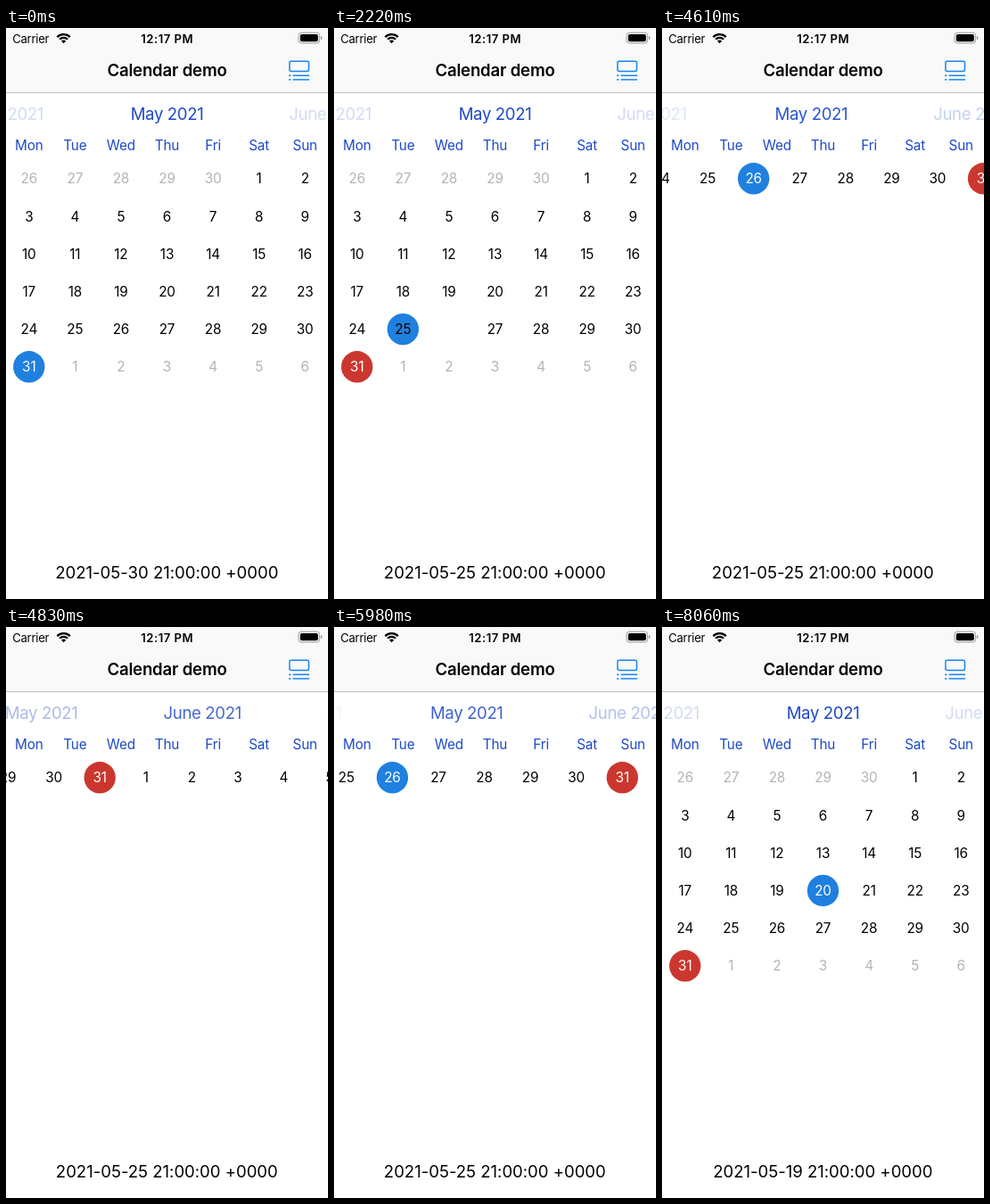
An HTML page with a canvas that plays this animation: 361 px wide and 640 px high, repeating every 8.13 s.

```html
<!DOCTYPE html>
<html lang="en">
<head>
<meta charset="utf-8">
<title>Calendar demo</title>
<style>
html, body { margin: 0; width: 100%; height: 100%; overflow: hidden; background: #fff; }
canvas { display: block; width: 361px; height: 640px; }
</style>
</head>
<body>
<canvas id="stage"></canvas>
<script>
const W = 361, H = 640, LOOP = 8130;
const COL = W / 7, ROW = 42.2, TOP = 168.8, RADIUS = 17.7;
const BLUE = '#1f80df', RED = '#cb372e', HEAD = '#1d49c9', TINT = '#1485f5', GRAY = '#b3b3b3';
const DAYS = ['Mon', 'Tue', 'Wed', 'Thu', 'Fri', 'Sat', 'Sun'];
const MONTH_TITLES = ['April 2021', 'May 2021', 'June 2021'];
const WEEK_TITLES = ['May 2021', 'May 2021', 'June 2021', 'June 2021'];
const TODAY = 31;

// Taps on a day; the circles cross-fade in two steps.
const PICKS = [
  { at: -1000, day: 31, step: 100 },
  { at: 1290, day: 25, step: 105 },
  { at: 2220, day: 26, step: 110 },
  { at: 7860, day: 20, step: 100 }
];

const canvas = document.getElementById('stage');
const ctx = canvas.getContext('2d');
const ratio = window.devicePixelRatio || 1;
canvas.width = W * ratio;
canvas.height = H * ratio;

function text(str, x, y, size, color, { weight = 400, align = 'center', track = -0.01 } = {}) {
  ctx.font = `${weight} ${size}px Inter, "Liberation Sans", sans-serif`;
  ctx.letterSpacing = (track * size) + 'px';
  ctx.textAlign = align;
  ctx.fillStyle = color;
  ctx.fillText(str, x, y);
}

function disc(x, y, r, color, alpha = 1) {
  ctx.globalAlpha = alpha;
  ctx.fillStyle = color;
  ctx.beginPath();
  ctx.arc(x, y, r, 0, Math.PI * 2);
  ctx.fill();
  ctx.globalAlpha = 1;
}

function box(x, y, w, h, r) {
  ctx.beginPath();
  ctx.roundRect(x, y, w, h, r);
}

function line(x1, y1, x2, y2) {
  ctx.beginPath();
  ctx.moveTo(x1, y1);
  ctx.lineTo(x2, y2);
  ctx.stroke();
}

function wifi(x, y) {
  const a = Math.PI * 0.25, up = -Math.PI / 2;
  ctx.strokeStyle = ctx.fillStyle = '#000';
  ctx.lineWidth = 2.3;
  for (const r of [6.4, 10.2]) {
    ctx.beginPath();
    ctx.arc(x, y, r, up - a, up + a);
    ctx.stroke();
  }
  ctx.beginPath();
  ctx.moveTo(x, y);
  ctx.arc(x, y, 3.7, up - a, up + a);
  ctx.fill();
}

function battery() {
  ctx.strokeStyle = '#9a9a9a';
  ctx.lineWidth = 1;
  box(328, 5.2, 23.6, 11.8, 3.2);
  ctx.stroke();
  ctx.fillStyle = '#000';
  box(329.8, 7, 20, 8.2, 1.9);
  ctx.fill();
  ctx.fillStyle = '#9a9a9a';
  box(353, 9, 1.4, 4.2, [0, 1.4, 1.4, 0]);
  ctx.fill();
}

function modeIcon(pressed) {
  ctx.globalAlpha = pressed ? 0.2 : 1;
  ctx.strokeStyle = ctx.fillStyle = TINT;
  ctx.lineWidth = 1.5;
  box(317.9, 37.2, 21.6, 11.4, 2);
  ctx.stroke();
  for (const y of [53.3, 57.9]) {
    line(321.6, y, 340, y);
    ctx.fillRect(317.2, y - 0.9, 1.9, 1.8);
  }
  ctx.globalAlpha = 1;
}

function navBar(pressed) {
  ctx.fillStyle = '#f9f9f9';
  ctx.fillRect(0, 0, W, 72);
  ctx.fillStyle = '#bcbcbc';
  ctx.fillRect(0, 72, W, 1);
  text('Carrier', 7.2, 16.5, 13.1, '#000', { align: 'left', track: -0.02 });
  wifi(64.6, 17.3);
  text('12:17 PM', 180.7, 16.5, 13.1, '#000', { weight: 600, track: 0.04 });
  battery();
  text('Calendar demo', 180.5, 54, 18.6, '#000', { weight: 600 });
  modeIcon(pressed);
}

// Titles sit half a page apart and fade away from the centre.
function titles(list, p) {
  list.forEach((title, i) => {
    const d = i - 1 - p;
    ctx.globalAlpha = Math.max(0, 1 - 0.8 * Math.abs(d));
    text(title, W / 2 * (1 + d), 103.2, 18.6, HEAD, { track: -0.02 });
  });
  ctx.globalAlpha = 1;
}

function selection(t) {
  const i = PICKS.findLastIndex(e => e.at <= t), pick = PICKS[i];
  return {
    day: pick.day,
    old: i ? PICKS[i - 1].day : 0,
    mix: Math.min(1, Math.floor((t - pick.at) / pick.step) / 2)
  };
}

// n counts days from 1 May.
function dayCell(n, x, y, sel, dimOthers) {
  const inMay = n >= 1 && n <= 31;
  const label = n < 1 ? n + 30 : n > 31 ? n - 31 : n;
  const on = n === sel.day ? sel.mix : n === sel.old ? 1 - sel.mix : 0;
  if (n === TODAY && on < 1) disc(x, y, RADIUS, RED);
  if (on) disc(x, y, RADIUS, BLUE, on);
  const white = n === sel.day || n === TODAY;
  text(label, x, y + 5.6, 15.3, white ? '#fff' : inMay || !dimOthers ? '#000' : GRAY);
}

function month(sel) {
  for (let i = 0; i < 42; i++)
    dayCell(i - 4, COL * (i % 7 + 0.5), TOP + ROW * Math.floor(i / 7), sel, true);
}

function week(sel, p) {
  for (let i = 0; i < 14; i++)
    dayCell(24 + i, COL * (i + 0.5) - p * W, TOP, sel, false);
}

// Swipe progress, sampled every 110 ms.
function swipe(t, start, steps, b) {
  const u = Math.min(steps, Math.max(0, Math.floor((t - start) / 110) + 1)) / steps;
  return 1 - Math.pow(1 - Math.pow(u, 2.6), b);
}

function draw(t) {
  const weekMode = t >= 3470 && t < 6960;
  const pressed = (t >= 3330 && t < 3470) || (t >= 6790 && t < 6960);
  const sel = selection(t);
  const p = weekMode ? swipe(t, 4610, 5, 4.92) - swipe(t, 5750, 4, 2.71) : 0;

  ctx.setTransform(ratio, 0, 0, ratio, 0, 0);
  ctx.fillStyle = '#fff';
  ctx.fillRect(0, 0, W, H);
  navBar(pressed);
  titles(weekMode ? WEEK_TITLES : MONTH_TITLES, p);
  DAYS.forEach((d, i) => text(d, COL * (i + 0.5), 137, 15.3, HEAD));
  if (weekMode) week(sel, p);
  else month(sel);
  text(`2021-05-${sel.day - 1} 21:00:00 +0000`, 180.3, 617, 18.6, '#000', { track: -0.002 });
}

const begin = performance.now();
function frame() {
  draw((performance.now() - begin) % LOOP);
  requestAnimationFrame(frame);
}
frame();
</script>
</body>
</html>
```
